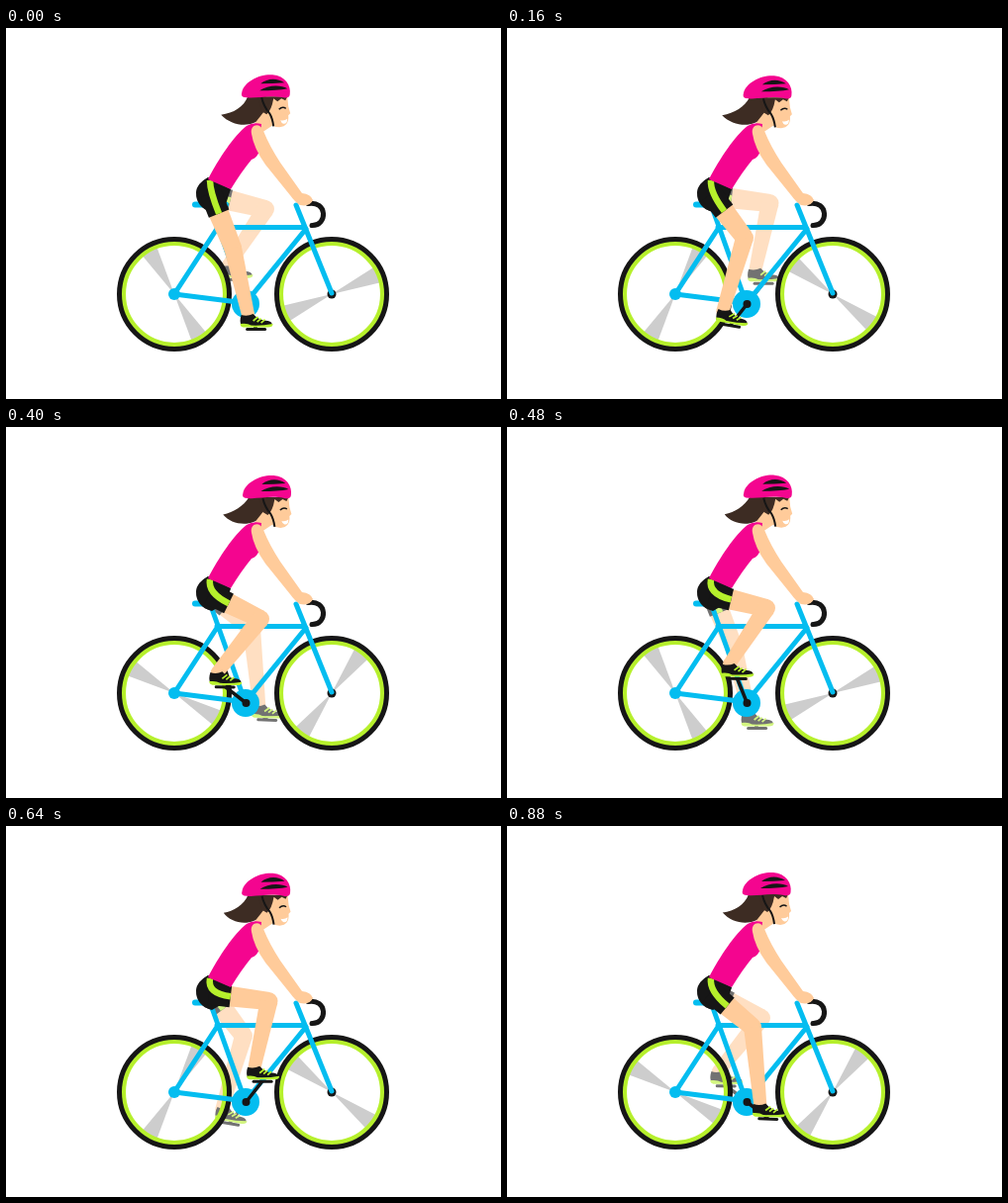
An HTML page that plays this animation: 500 px wide and 375 px high, repeating every 0.96 s.

```html
<!DOCTYPE html>
<html>
<head>
<meta charset="utf-8">
<title>Cyclist</title>
<style>
html, body { margin: 0; width: 100%; height: 100%; overflow: hidden; background: #fff; }
svg { display: block; width: 500px; height: 375px; }
</style>
</head>
<body>
<svg viewBox="0 0 500 375" fill="none">
  <g id="farLeg" opacity=".6"></g>

  <g id="wheels"></g>

  <g stroke="#04bdf0" stroke-width="5" stroke-linecap="round" stroke-linejoin="round">
    <path d="M207 181L242 279M213 201.500H301M213 203L170 269L242 278L303 203"/>
    <path d="M191 178.500H222" stroke-width="6"/>
    <circle cx="329" cy="269" r="4.500" fill="#161616" stroke="none"/>
    <path d="M293 179L329 268"/>
    <circle cx="170" cy="269" r="6" fill="#04bdf0" stroke="none"/>
    <circle cx="242" cy="279" r="14" fill="#04bdf0" stroke="none"/>
  </g>
  <path d="M305 177.500C325 174 325 200 309 199.500" stroke="#161616" stroke-width="5" stroke-linecap="round"/>

  <g id="nearLeg"></g>

  <path id="hair" fill="#3d2c23"/>
  <path fill="#ffcb9a" d="M261 84L250 98L258 106L270 98Z"/>
  <path fill="#f4058f" d="M204 153C215 132 230 109 243 99Q249 95 258 97L256 124Q254 131 248 133Q238 145 227 163Z"/>
  <path fill="#ffcb9a" d="M248 107C246 97 257 95 260 104Q266 119 277 136L299 167Q308 168 310 174Q307 181 297 179Q292 176 287 169L262 138Q250 121 248 107Z"/>

  <g id="head">
    <path fill="#ffcb9a" d="M262 69H284L285 79L287 86L285 88Q286 99 276 100Q266 100 262 88Z"/>
    <path fill="#3d2c23" d="M254 69H284L282 73L278 71L274 74L270 71Q268 83 263 87L258 84Z"/>
    <path d="M258 70Q260 79 266 86Q269 91 270 99" stroke="#161616" stroke-width="2"/>
    <path d="M275.500 82Q279 78.500 282.500 81" stroke="#161616" stroke-width="1.500"/>
    <path fill="#fff" d="M277 93Q281 94 284 91.500Q284 97 280 96.500Q278 96 277 93Z"/>
    <path fill="#f4058f" d="M238 65C240 54 256 46 269 47C282 48 288 58 286.500 67Q286 71 280 70C265 67 254 71 243 70Q236 70 238 65Z"/>
    <path fill="#161616" d="M257 56C264 50 274 50 281 55Q269 56 257 56ZM256 63C264 57 278 57 284 61Q274 63 256 63Z"/>
  </g>
</svg>
<script>
const STEP = 80, COUNT = 12;
const SKIN = '#ffcb9a', BLACK = '#161616', LIME = '#b6f02c';
const HIP = [208, 170], CRANK = [242.5, 279], CRANK_LENGTH = 27;

// knee x, knee y, shoe tilt for each twelfth of a pedal turn
const POSES = [
  [229, 222, 0], [235, 211, 2], [240, 212, 10], [245, 210, 13],
  [251, 203, 8], [257, 194, 1], [262, 183, 1], [264, 176, 0],
  [265.5, 177, 0], [262, 185, -10], [255, 194, -5], [248, 203, 2]
];

const $ = id => document.getElementById(id);
const rad = deg => deg * Math.PI / 180;
const wave = (k, peak) => Math.cos(rad(30 * (k - peak)));
const line = (a, b, color, width) =>
  `<path d="M${a}L${b}" stroke="${color}" stroke-width="${width}"/>`;

// tapered segment with a round end
function limb(a, ra, b, rb) {
  const angle = Math.atan2(b[1] - a[1], b[0] - a[0]);
  const nx = -Math.sin(angle), ny = Math.cos(angle);
  const side = (p, r) => [p[0] + nx * r, p[1] + ny * r];
  return `<path fill="${SKIN}" d="M${side(a, ra)}L${side(b, rb)}L${side(b, -rb)}L${side(a, -ra)}Z"/>` +
    `<circle cx="${b[0]}" cy="${b[1]}" r="${rb}" fill="${SKIN}"/>`;
}

function shoe([x, y], tilt) {
  return `<g transform="translate(${x} ${y}) rotate(${tilt})">
    <path d="M-9 .5H9" stroke="${BLACK}" stroke-width="3" stroke-linecap="round"/>
    <path fill="${BLACK}" d="M-15 -14Q-9 -12 -3 -15Q3 -8 12 -8Q17 -7 16 -3H-15Q-17 -8 -15 -14Z"/>
    <path fill="${LIME}" d="M-16 -5Q-9 -6 -5 -3.500Q6 -3 17 -5Q17 -1.500 12 -1.500H-13Q-16 -2 -16 -5Z"/>
    <path d="M-3 -8L2 -12M1 -7L5 -10.500M5 -6L9 -9.500" stroke="${LIME}" stroke-width="1.700"/>
  </g>`;
}

function leg(k) {
  const [kx, ky, tilt] = POSES[k];
  const turn = rad(68 + 30 * k);
  const pedal = [CRANK[0] + CRANK_LENGTH * Math.cos(turn), CRANK[1] + CRANK_LENGTH * Math.sin(turn)];
  const ankle = [pedal[0] - 8, pedal[1] - 14];
  const length = Math.hypot(kx - HIP[0], ky - HIP[1]);
  const along = d => [HIP[0] + (kx - HIP[0]) * d / length, HIP[1] + (ky - HIP[1]) * d / length];
  return line(CRANK, pedal, BLACK, 3.5) +
    `<circle cx="${CRANK[0]}" cy="${CRANK[1]}" r="4" fill="${BLACK}"/>` +
    limb(along(12), 10.5, [kx, ky], 9) + limb([kx, ky], 9, ankle, 6.5) +
    shoe(pedal, tilt) +
    `<path fill="${BLACK}" d="M204 151L227 163L222 178L208 186Q192 182 192 166Q193 157 204 151Z"/>` +
    line(along(-3), along(19), BLACK, 22) +
    `<path d="M206 154Q${along(-5)} ${along(19)}" stroke="${LIME}" stroke-width="6.500"/>`;
}

function wheel(x, angle) {
  const y = 269;
  const wedge = 'M0 0L50 -8.500V8.500Z';
  return `<g transform="translate(${x} ${y})">
    <path d="${wedge}" fill="#cdcdcd" transform="rotate(${angle})"/>
    <path d="${wedge}" fill="#cdcdcd" transform="rotate(${angle + 180})"/>
    <circle r="51.200" stroke="${LIME}" stroke-width="4.500"/>
    <circle r="55.500" stroke="${BLACK}" stroke-width="5"/>
  </g>`;
}

function draw(k) {
  $('farLeg').innerHTML = leg((k + 6) % COUNT);
  $('nearLeg').innerHTML = leg(k);
  $('wheels').innerHTML = wheel(170, 60 + 30 * k) + wheel(329, 30 * k - 23);

  const dy = 1 + wave(k, 4.5), dx = dy * 0.7;
  const tip = 218.5 + 1.5 * wave(k, 7);
  $('head').setAttribute('transform', `translate(${dx} ${dy})`);
  $('hair').setAttribute('d', `M${244 + dx} ${69 + dy}C240 80 230 86 ${tip} ${87.5 + dy / 2}` +
    `C226 97 240 100 250 96C258 93 265 88 265 80L${263 + dx} ${69 + dy}Z`);
}

let shown = -1;
function tick() {
  const k = Math.floor(performance.now() / STEP) % COUNT;
  if (k !== shown) draw(shown = k);
  requestAnimationFrame(tick);
}
tick();
</script>
</body>
</html>
```
